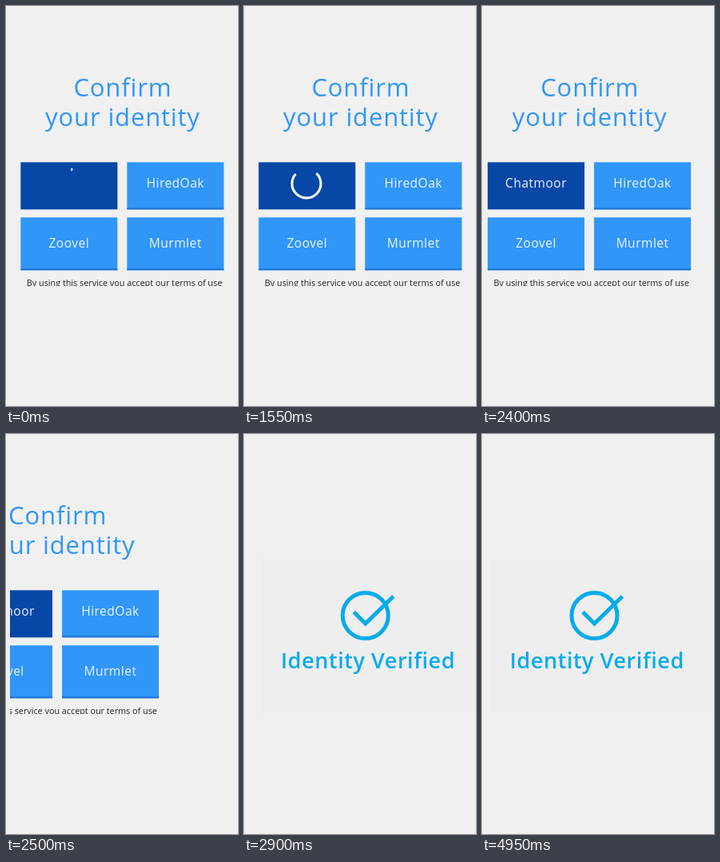
Animation of 290 by 500 pixels, one loop 5 s. Source, as an HTML page with a canvas:

```html
<!DOCTYPE html>
<html lang="en">
<head>
<meta charset="utf-8">
<title>Confirm your identity</title>
<style>
  html, body { margin: 0; width: 100%; height: 100%; overflow: hidden; background: #f0f0f0; }
  canvas { display: block; }
</style>
</head>
<body>
<canvas id="stage" width="290" height="500"></canvas>
<script>
const ctx = document.getElementById('stage').getContext('2d');
const LOOP = 5000;
const BLUE = '#3096f8', EDGE = '#1c74d4', DARK = '#0747a6', CYAN = '#08abeb';
const SPIN_END = 2110;
const SLIDE = { start: 2321, duration: 741, distance: 375 };
const rad = deg => deg * Math.PI / 180;
const clamp = v => Math.min(1, Math.max(0, v));
const smooth = v => { v = clamp(v); return v * v * (3 - 2 * v); };

// cubic-bezier(.4, 0, .2, 1)
function standardEase(x) {
  let lo = 0, hi = 1;
  for (let i = 0; i < 24; i++) {
    const s = (lo + hi) / 2, r = 1 - s;
    if (1.2 * r * r * s + 0.6 * r * s * s + s ** 3 < x) lo = s; else hi = s;
  }
  return x >= 1 ? 1 : 3 * (1 - lo) * lo * lo + lo ** 3;
}

function text(str, x, y, size, color, spacing = 0, weight = 400) {
  ctx.font = `${weight} ${size}px "Open Sans", sans-serif`;
  ctx.letterSpacing = spacing + 'px';
  ctx.textAlign = 'center';
  ctx.fillStyle = color;
  ctx.fillText(str, x + spacing / 2, y);
}

function button(x, y, h, label, pressed) {
  ctx.fillStyle = pressed ? DARK : BLUE;
  ctx.fillRect(x, y, 121, h);
  if (!pressed) {
    ctx.fillStyle = EDGE;
    ctx.fillRect(x, y + h - 2, 121, 2);
  }
  if (label) text(label, x + 60.2, y < 250 ? 227 : 302, 15.5, '#eff5fd', 0.5);
}

// The head runs ahead in the first half of a cycle, the tail catches up in the second.
function spinner(t) {
  const period = 1085, sweep = 270;
  const turns = (t + 50) / period;
  const phase = turns % 1;
  const base = 280 + 0.08 * t + sweep * Math.floor(turns);
  const tail = base + sweep * smooth(phase * 2 - 1);
  const head = base + sweep * smooth(phase * 2);
  ctx.strokeStyle = '#fff';
  ctx.lineWidth = 3;
  ctx.beginPath();
  ctx.arc(78, 222, 18, rad(tail), rad(head));
  ctx.stroke();
}

function confirmScreen(t) {
  const loading = t < SPIN_END;
  text('Confirm', 145.5, 113.3, 31, BLUE, 0.85);
  text('your identity', 145.5, 150.3, 31, BLUE, 0.85);
  button(18.3, 195.3, 59, loading ? '' : 'Chatmoor', true);
  button(151.3, 195.3, 59, 'HiredOak');
  button(18.3, 264.3, 66, 'Zoovel');
  button(151.3, 264.3, 66, 'Murmlet');
  if (loading) spinner(t);
  text('By using this service you accept our terms of use', 148, 350, 10.8, '#222');
}

function verifiedScreen() {
  ctx.fillStyle = '#eee';
  ctx.fillRect(10, 153, 290, 200);
  ctx.strokeStyle = CYAN;
  ctx.lineWidth = 5;
  ctx.beginPath();
  ctx.arc(140.5, 227, 28.5, 0, 2 * Math.PI);
  ctx.moveTo(126, 222.5);
  ctx.lineTo(140.5, 237);
  ctx.lineTo(175.5, 203);
  ctx.stroke();
  text('Identity Verified', 143.5, 293, 27, CYAN, 0.55, 600);
}

function screen(shift, clip, paint) {
  ctx.save();
  ctx.beginPath();
  ctx.rect(...clip);
  ctx.clip();
  ctx.translate(shift, 0);
  paint();
  ctx.restore();
}

function draw(t) {
  ctx.fillStyle = '#f0f0f0';
  ctx.fillRect(0, 0, 290, 500);
  const moved = SLIDE.distance * standardEase(clamp((t - SLIDE.start) / SLIDE.duration));
  if (moved < SLIDE.distance) screen(-moved, [5, 0, 285, 350], () => confirmScreen(t));
  if (moved > 0) screen(SLIDE.distance - moved, [0, 0, 290, 500], verifiedScreen);
}

let origin;
function tick(now) {
  origin ??= now;
  draw((now - origin) % LOOP);
  requestAnimationFrame(tick);
}
draw(0);
requestAnimationFrame(tick);
</script>
</body>
</html>
```
